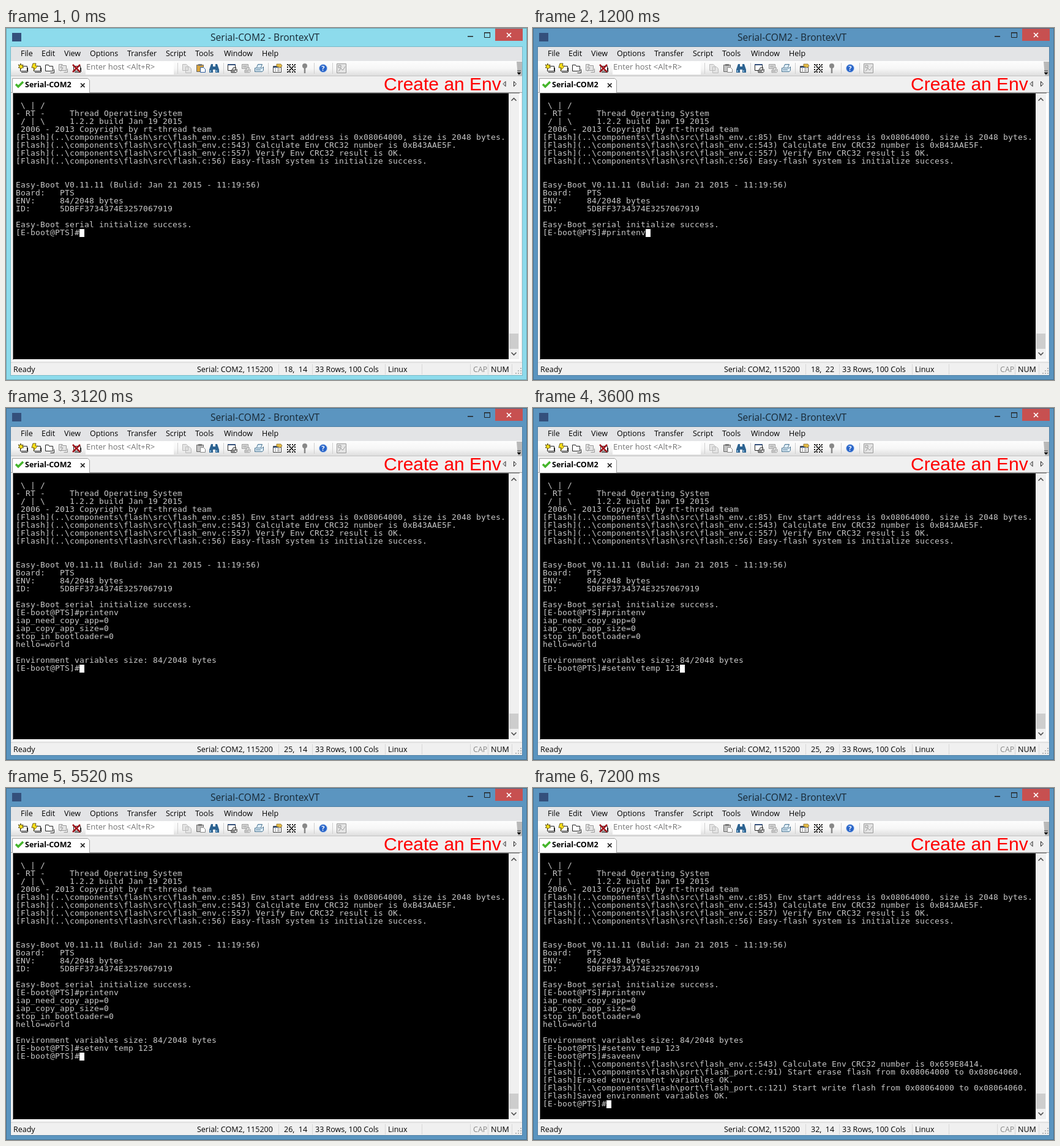
Animation of 851x576 px, one loop 8000 ms. Source, as an HTML page:

```html
<!DOCTYPE html>
<html lang="en">
<head>
<meta charset="utf-8">
<title>Serial terminal</title>
<style>
  html, body { margin: 0; width: 100%; height: 100%; overflow: hidden; }
  svg, #term { position: absolute; left: 0; top: 0; }
  svg { width: 851px; height: 576px; --frame: #8ddbec; }
  svg text { font: 12.5px "Open Sans", sans-serif; white-space: pre; fill: #000; }
  #term {
    left: 16px; top: 107px; margin: 0; color: #c8c8c8;
    font: 13px/13px "DejaVu Sans Mono", monospace;
    letter-spacing: calc(8px - 1ch);
  }
  #cursor { position: absolute; width: 8px; height: 13px; background: #fff; }
  .line { fill: none; stroke: #222; }
  .gray { fill: #e4e4e4; stroke: #999; }
</style>
</head>
<body>
<svg viewBox="0 0 851 576">
  <defs>
    <linearGradient id="bar" x2="0" y2="1">
      <stop stop-color="#fdfdfd"/><stop offset=".5" stop-color="#f6f6f6"/><stop offset="1" stop-color="#dcdcdc"/>
    </linearGradient>
    <g id="screen">
      <path d="M3.500 4.500h11v8h-11z" fill="#fff" stroke="#222"/>
      <path d="M5 14.500h10M15.500 7v7" stroke="#222"/>
    </g>
    <g id="folder">
      <path d="M1.500 1.500h5l1 2h6v8h-12zM9.500 14.500h6v-6"/>
    </g>
    <g id="printer">
      <path d="M4.500 6.500l2-5h7l-2 5M1.500 7.500h12l2-2v6l-2 2h-12zM3 10.500h8"/>
    </g>
  </defs>

  <!-- Window frame and title bar -->
  <rect width="851" height="576" style="fill:var(--frame)"/>
  <g fill="none" stroke="#000" stroke-opacity=".25">
    <rect x=".5" y=".5" width="850" height="575"/>
    <rect x="7.500" y="30.500" width="836" height="538" stroke-opacity=".15"/>
  </g>
  <rect x="10" y="8" width="15" height="14" fill="#34507c"/>
  <text x="334" y="21" style="font-size:15.6px;fill:#182834">Serial-COM2 - BrontexVT</text>
  <path d="M754 14h9M781 8h10M781.500 8v7.500h9V8" class="line"/>
  <path d="M754 13.500h9M781 7.500h10" class="line"/>
  <path d="M799 1h45v20h-45z" fill="#c75050"/>
  <path d="M818 8l7 7m0-7l-7 7" stroke="#fff" stroke-width="1.700"/>

  <!-- Menu, toolbar and tab backgrounds -->
  <path d="M8 31h835v537H8z" fill="#f0f0f0"/>
  <path d="M8 31h835v23H8z" fill="#e3e4e6"/>
  <path d="M8 54h835v25H8z" fill="url(#bar)"/>
  <path d="M834 55h9v23h-7z" fill="#b9b9b9"/>
  <path d="M835 70h6M835 73h6l-3 3z" stroke="#222" stroke-width=".8"/>
  <path d="M8 78.500h835" stroke="#c4c4c4"/>
  <path d="M130 55h144v21H130z" fill="#fff"/>
  <path d="M280.500 57v18M355.500 57v18M428.500 57v18M503.500 57v18M533.500 57v18" stroke="#cfcfcf"/>
  <text y="46"><tspan x="24">File</tspan><tspan x="58">Edit</tspan><tspan x="95">View</tspan><tspan x="137">Options</tspan><tspan x="198">Transfer</tspan><tspan x="261">Script</tspan><tspan x="309">Tools</tspan><tspan x="356">Window</tspan><tspan x="418">Help</tspan></text>
  <text x="131" y="68" style="font-size:13px;fill:#737373">Enter host &lt;Alt+R&gt;</text>

  <!-- Toolbar icons -->
  <g transform="translate(20 58)">
    <use href="#screen"/>
    <path d="M4 0l1 3 3-1-1 3 2 2-3 0-2 3-1-3-3 0 2-2-2-3 3 1z" fill="#ffe21a" stroke="#443a00" stroke-width=".8"/>
  </g>
  <g transform="translate(42 58)">
    <use href="#screen"/>
    <path d="M2 0h5l-1 4h4l-7 8 1-5H0z" fill="#ffe21a" stroke="#443a00" stroke-width=".8"/>
  </g>
  <use href="#folder" x="63" y="59" fill="#fff" stroke="#222"/>
  <g transform="translate(85 58)">
    <use href="#folder" class="gray"/>
    <path d="M7 1l-3 6h4l-4 6" class="line" style="stroke:#999"/>
  </g>
  <g transform="translate(107 58)">
    <use href="#screen"/>
    <path d="M2 2l12 12M14 2L2 14" stroke="#a00f18" stroke-width="2.500"/>
  </g>
  <path d="M288.500 59.500h6l3 3v7h-9zM293.500 63.500h6l3 3v7h-9z" class="gray" style="stroke:#bbb"/>
  <g transform="translate(310 58)">
    <path id="board" d="M1.500 2.500h11v11h-11z" stroke="#666"/>
    <path d="M4 1h6v3H4z" fill="#777"/>
    <path id="sheet" d="M7.500 6.500h5l3 3v5h-8z" fill="#fff"/>
  </g>
  <path d="M335 59h3v4h4v-4h3l3 9v5h-6v-5h-4v5h-6v-5z" fill="#2d6391"/>
  <path d="M334 69v3m10-3v3" stroke="#9fd0f2" stroke-width="1.500"/>
  <g transform="translate(362 58)">
    <path d="M.5 1.500h12v10H.5z" fill="#fff" stroke="#222"/>
    <path d="M0 1h13v2H0z" fill="#34507c"/>
    <use href="#printer" transform="translate(5 6) scale(.65)" fill="#fff" stroke="#111" stroke-width="1.500"/>
  </g>
  <g transform="translate(384 58)">
    <path d="M1.500 1.500h10v7h-10zM3 4h7M3 6h6" class="gray"/>
    <use href="#printer" transform="translate(5 6) scale(.65)" class="gray" style="stroke:#777"/>
  </g>
  <use href="#printer" x="405" y="58" fill="#dcecf7" stroke="#46718e"/>
  <g transform="translate(435 58)">
    <path d="M1.500 4.500h13v10h-13z" fill="#fff" stroke="#444"/>
    <path d="M2 5h12v2H2z" fill="#34507c"/>
    <path d="M4 9h2m2 0h4M4 12h2m2 0h4" stroke="#555"/>
    <path d="M7 1h7l2 3-3 3-6-2z" fill="#e5bd48" stroke="#76591d" stroke-width=".7"/>
  </g>
  <g transform="translate(458 58)" class="line" stroke-width="2">
    <path d="M1 2h15M1 6h15M1 10h15M1 14h15" stroke-dasharray="2 2"/>
    <path d="M3 2l11 12M14 2L3 14" stroke-width="1.200"/>
  </g>
  <circle cx="488" cy="62" r="4" fill="#888"/>
  <path d="M488 65v9" stroke="#888" stroke-width="2.500"/>
  <circle cx="518" cy="66" r="6.500" fill="#2864c8" stroke="#b4cdf0"/>
  <text x="515.200" y="70" style="font-size:11px;font-weight:bold;fill:#fff">?</text>
  <path d="M540.500 58.500h15v15h-15zM543 71l4-5 3 3 4-6M543 61h4v4h-4z" class="gray"/>

  <!-- Tab row -->
  <path d="M8 105.500h835" stroke="#a0a0a0"/>
  <path d="M10.500 106V82.500h123l3 3V106z" fill="#fff" stroke="#a0a0a0"/>
  <path d="M11 105h125v2H11z" fill="#fff"/>
  <path d="M16 92l4 4 8-8" fill="none" stroke="#45b52b" stroke-width="3.500"/>
  <text x="31" y="97" style="font-weight:bold">Serial-COM2</text>
  <path d="M122 90.500l6.500 6.500m0-6.500l-6.500 6.500" stroke="#111" stroke-width="1.600"/>
  <path d="M816 87.500v8l-4-4zM829.500 87.500v8l4-4z" class="line"/>
  <text x="617" y="102" style="font:30px 'Liberation Sans',sans-serif;fill:#f00">Create an Env</text>

  <!-- Terminal and scrollbar -->
  <path d="M10 106h831v439H10z" fill="#fff"/>
  <path d="M11.500 543V106.500H839" class="line" style="stroke:#707070"/>
  <path d="M12 107h809v435H12z"/>
  <path d="M821 107h17v435h-17z" fill="#f0f0f0"/>
  <path d="M822 500h15v25h-15z" fill="#cdcdcd"/>
  <path d="M825.500 119l4-4 4 4M825.500 531l4 4 4-4" class="line" stroke-width="1.700" style="stroke:#505050"/>

  <!-- Status bar -->
  <path d="M8 547.500h835" stroke="#d7d7d7"/>
  <path d="M445.500 550v17M500.500 550v17M619.500 550v17M679.500 550v17M758.500 550v17M787.500 550v17M826.500 550v17" stroke="#d7d7d7"/>
  <text y="563"><tspan x="12">Ready</tspan><tspan x="312">Serial: COM2, 115200</tspan><tspan x="454" id="place"></tspan><tspan x="505">33 Rows, 100 Cols</tspan><tspan x="624">Linux</tspan><tspan x="763" fill="#888">CAP</tspan><tspan x="792">NUM</tspan></text>
  <path d="M832 565h2m2 0h2m2 0h2M836 561h2m2 0h2M840 557h2" stroke="#b5b5b5" stroke-width="2"/>
</svg>
<pre id="term"><span id="log"></span><span id="cursor"></span></pre>

<script>
const STEP = 1200, LOOP = 8000;
const prompt = "[E-boot@PTS]#";

// Each entry is appended to the terminal when its step begins.
const output = [
  String.raw`
 \ | /
- RT -     Thread Operating System
 / | \     1.2.2 build Jan 19 2015
 2006 - 2013 Copyright by rt-thread team
[Flash](..\components\flash\src\flash_env.c:85) Env start address is 0x08064000, size is 2048 bytes.
[Flash](..\components\flash\src\flash_env.c:543) Calculate Env CRC32 number is 0xB43AAE5F.
[Flash](..\components\flash\src\flash_env.c:557) Verify Env CRC32 result is OK.
[Flash](..\components\flash\src\flash.c:56) Easy-flash system is initialize success.


Easy-Boot V0.11.11 (Bulid: Jan 21 2015 - 11:19:56)
Board:   PTS
ENV:     84/2048 bytes
ID:      5DBFF3734374E3257067919

Easy-Boot serial initialize success.
${prompt}`,
  "printenv",
  `
iap_need_copy_app=0
iap_copy_app_size=0
stop_in_bootloader=0
hello=world

Environment variables size: 84/2048 bytes
${prompt}`,
  "setenv temp 123",
  `\n${prompt}`,
  "saveenv",
  String.raw`
[Flash](..\components\flash\src\flash_env.c:543) Calculate Env CRC32 number is 0x659E8414.
[Flash](..\components\flash\port\flash_port.c:91) Start erase flash from 0x08064000 to 0x08064060.
[Flash]Erased environment variables OK.
[Flash](..\components\flash\port\flash_port.c:121) Start write flash from 0x08064000 to 0x08064060.
[Flash]Saved environment variables OK.
${prompt}`
];

const get = id => document.getElementById(id);
let shown = -1;

function show(step) {
  const text = output.slice(0, step + 1).join("");
  const lines = text.split("\n");
  const row = lines.length, col = lines[row - 1].length + 1;
  get("log").textContent = text;
  get("cursor").style.left = (col - 1) * 8 + "px";
  get("cursor").style.top = (row - 1) * 13 + 1 + "px";
  get("place").textContent = `${row},  ${col}`;

  const first = step === 0;
  document.querySelector("svg").style.setProperty("--frame", first ? "#8ddbec" : "#5b95c0");
  get("board").setAttribute("fill", first ? "#dba53c" : "#c4c4c4");
  get("sheet").setAttribute("stroke", first ? "#2f5e9e" : "#888");
}

function tick() {
  const step = Math.floor(performance.now() % LOOP / STEP);
  if (step !== shown) show(shown = step);
  requestAnimationFrame(tick);
}
tick();
</script>
</body>
</html>
```
